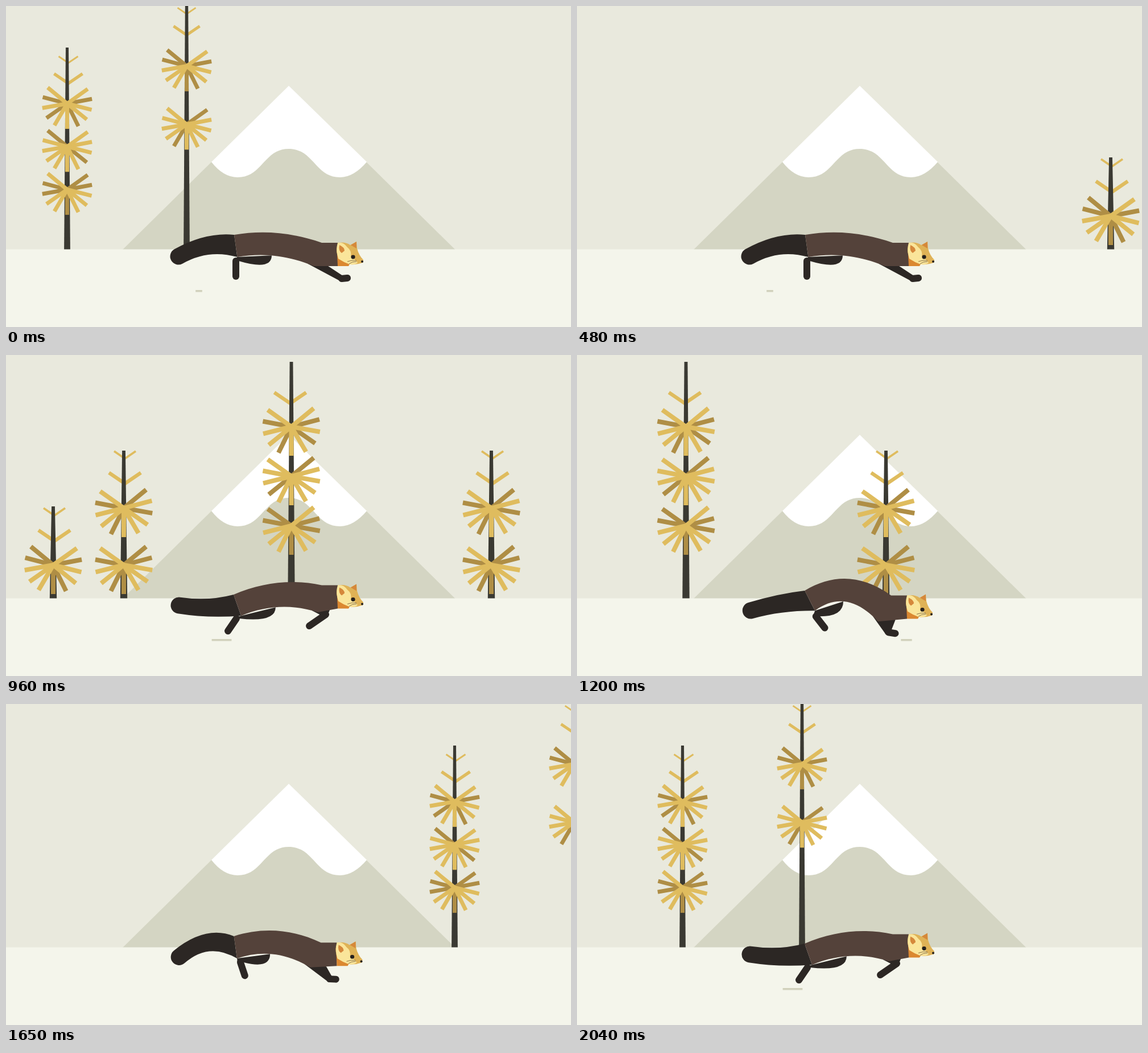
Recreate the animation shown at these times as an HTML page. Size 993x564 px, loop 2070 ms.

```html
<!DOCTYPE html>
<html lang="en">
<head>
<meta charset="utf-8">
<title>Running marten</title>
<style>
html, body { margin: 0; width: 100%; height: 100%; overflow: hidden; background: #e9e9dd; }
svg { display: block; width: 993px; height: 564px; }
</style>
</head>
<body>
<svg viewBox="0 0 993 564">
  <rect width="993" height="564" fill="#e9e9dd"/>
  <path d="M497 140L789.500 428H205Z" fill="#d4d5c3"/>
  <path d="M497 140L634 274Q611 301 587 301C543 301 541 251 497 251C453 251 451 301 407 301Q382 301 361 274Z" fill="#fff"/>
  <g id="trees"></g>
  <rect y="427.5" width="993" height="137" fill="#f4f5eb"/>
  <rect id="shadow" y="499" height="3.500" fill="#d1d1bc"/>
  <g fill="#2c2724" stroke="#2c2724" stroke-width="0">
    <path id="tail"/>
    <path id="hindLeg"/>
    <path id="frontLeg"/>
    <g stroke-width="12" stroke-linecap="round">
      <path id="hindPaw"/>
      <path id="frontPaw"/>
    </g>
  </g>
  <path id="torso" fill="#54423a"/>
  <g id="head">
    <path d="M582 436L583 457L602 457L606 450Z" fill="#db8831"/>
    <path d="M584 416Q597 414 605 420L616 414L617 426Q620 438 628 446L627 451Q616 455 606 454L588 446Q580 438 581 426Z" fill="#dfb256"/>
    <path d="M583 416Q593 414 600 424Q608 430 606 440Q613 444 618 451Q612 455 604 454Q593 450 584 444Q579 428 583 416Z" fill="#fae59a"/>
    <path d="M586 420Q595 424 595 430L590 434Q584 430 586 420ZM606 420L616 414L616 426Z" fill="#d5883b"/>
    <ellipse cx="610" cy="441" rx="3.6" ry="3.4" fill="#25201d"/>
    <circle cx="626" cy="449" r="2" fill="#25201d"/>
    <path d="M616 447Q608 446 600 449M616 449Q608 449 603 453" fill="none" stroke="#6b5435" stroke-width=".8"/>
  </g>
</svg>
<script>
const LOOP = 2070, STEP = 30, STRIDE = 18, WORLD = 3212, MARGIN = 300;
const LIGHT = '#dfbc5e', DARK = '#af8e45', BARK = '#3a3932';
const $ = id => document.getElementById(id);
const rad = degrees => degrees * Math.PI / 180;
const clamp01 = v => Math.max(0, Math.min(1, v));
const add = ([x, y], dx, dy) => [x + dx, y + dy];
const mix = (a, b, k) => a.map((v, i) => v + (b[i] - v) * k);

// Needles a-e fan down the left side, f-j down the right, k hangs; letters in `dark` are shaded.
function cluster(y, dark, scale, flip) {
  const isDark = c => dark.includes(c);
  const needle = c => {
    const i = 'abcdefghijk'.indexOf(c), left = i < 5;
    const tilt = rad((left === flip ? 39.5 : 35.5) - 24.8 * (i % 5));
    const side = left ? -1 : 1, reach = 51 * scale;
    const dx = c === 'k' ? 0 : side * reach * Math.cos(tilt);
    const dy = c === 'k' ? reach : -reach * Math.sin(tilt);
    return `<path d="M0 ${y}l${dx} ${dy}" stroke="${isDark(c) ? DARK : LIGHT}" stroke-width="${8 * scale}"/>`;
  };
  return [...'abcdefghijk'].sort((a, b) => isDark(b) - isDark(a)).map(needle).join('');
}

const fork = (y, span, lean) =>
  `<path d="M${lean - span} ${y - span * .68}L${lean} ${y}L${lean + span} ${y - span * .68}"
    fill="none" stroke="${LIGHT}" stroke-width="${span * .3 - 2}"/>`;

function tree({ top, scale = 1, lean = 0, flip = false, forks, clusters }) {
  const tip = 2.9 * scale, foot = 6.2 * scale;
  return forks.map(([y, span]) => fork(y, span, lean)).join('') +
    `<path d="M${-tip} ${top}H${tip}L${foot} 428H${-foot}Z" fill="${BARK}"/>` +
    clusters.map(([y, dark]) => cluster(y, dark, scale, flip)).join('');
}

const small = tree({ top: 266, lean: 2, flip: true, forks: [[282, 19], [327, 28]], clusters: [[369, 'abgjk']] });
const medium = tree({ top: 168, lean: 2, forks: [[182, 19], [226, 28]], clusters: [[269, 'befh'], [369, 'befgk']] });
const tall = tree({ top: 12, lean: -2, forks: [[85, 28]], clusters: [[126, 'begi'], [213, 'df'], [300, 'abghk']] });
const slim = tree({ top: 73, scale: .87, lean: 2, flip: true, forks: [[100, 17], [136, 25]],
  clusters: [[171.5, 'bdgj'], [247, 'ai'], [322.5, 'bcfgk']] });
const lofty = tree({ top: -25, scale: .87, flip: true, forks: [[14, 16], [51, 23]],
  clusters: [[105.5, 'abgjk'], [208, 'ef']] });

const forest = [[1664, small], [1788, medium], [2082.5, tall], [2434, medium], [3319.5, slim], [3529.5, lofty]];
$('trees').innerHTML = forest.map(([, art]) => `<g>${art}</g>`).join('');
const treeNodes = [...$('trees').children];

// Distance run, as [time, pixels].
const run = [[0, 0], [480, 726], [720, 1218], [960, 1581], [1440, 2201], [1860, 2861], [2040, 3134], [LOOP, WORLD]];

// Joints of the stride: push off, stretch, front landing, hind landing, gather.
const poses = [
  { at: 0, rump: [400, 421], tail: [304, 440], head: [0, -11.5], chest: [548, 452],
    hind: [[405, 463], [390, 485]], front: [[562, 456], [533, 476]] },
  { at: 2, rump: [401, 402], tail: [303, 440], head: [0, 0], chest: [541, 457],
    hind: [[404, 448], [404, 475]], front: [[590, 479], [600, 478]] },
  { at: 10, rump: [400, 418], tail: [306, 452], head: [-4, 8.5], chest: [525, 472],
    hind: [[425, 463], [446, 481]], front: [[533, 490], [546, 493]] },
  { at: 12, rump: [410, 438], tail: [306, 447], head: [-4, 8.5], chest: [547, 466],
    hind: [[479, 493], [497, 494]], front: [[534, 471], [508, 487]] },
  { at: 16, rump: [402, 444], tail: [313, 428], head: [-1, -6.5], chest: [540, 466],
    hind: [[418, 493], [441, 493]], front: [[558, 471], [520, 475]] }
];
poses.push({ ...poses[0], at: STRIDE });

const between = (keys, t, time) => {
  const i = Math.max(1, keys.findIndex(key => time(key) >= t));
  const a = keys[i - 1], b = keys[i];
  return [a, b, (t - time(a)) / (time(b) - time(a))];
};

function drawMarten(phase) {
  const [from, to, k] = between(poses, phase, pose => pose.at);
  const joint = name => mix(from[name], to[name], k);
  const limb = name => from[name].map((point, i) => mix(point, to[name][i], k));
  const wave = (mean, swing, peak) => mean + swing * Math.cos((phase - peak) * 2 * Math.PI / STRIDE);
  const set = (id, d) => $(id).setAttribute('d', d);

  const rump = joint('rump'), chest = joint('chest'), tip = joint('tail'), head = joint('head');
  const seam = rad(wave(27, 22, 12.5)), arch = wave(20, 10, 11);
  const loin = add(rump, 39.5 * Math.sin(seam), 39.5 * Math.cos(seam));
  const neck = add(head, 583, 416), throat = add(neck, 0, 41), shoulder = add(neck, -28, 0);
  const lift = (a, b, t) => add(mix(a, b, t), 0, -arch * 4 / 3);
  const belly = t => add(mix(loin, chest, t), 0, -arch * 4 * t * (1 - t));

  set('torso', `M${rump}C${lift(rump, shoulder, 1 / 3)} ${lift(rump, shoulder, 2 / 3)} ${shoulder}
    L${neck}L${throat}L${chest}C${lift(chest, loin, 1 / 3)} ${lift(chest, loin, 2 / 3)} ${loin}Z`);

  const root = mix(rump, loin, .5);
  const bend = add(mix(root, tip, .5), 0, 2 * wave(4, 21, 13.5));
  const offset = (p, angle, r) => add(p, r * Math.sin(angle), -r * Math.cos(angle));
  const axis = Math.atan2(root[1] - tip[1], root[0] - tip[0]);
  const tipAxis = Math.atan2(bend[1] - tip[1], bend[0] - tip[0]);
  set('tail', `M${rump}Q${offset(bend, axis, 15)} ${offset(tip, tipAxis, 14.5)}
    A14.5 14.5 0 0 0 ${offset(tip, tipAxis, -14.5)}Q${offset(bend, axis, -15)} ${loin}Z`);

  const [ankle, hindToe] = limb('hind'), thigh = belly(.45);
  set('hindLeg', `M${loin}L${add(ankle, -5, 0)}L${add(ankle, 5, 0)}Q${add(thigh, 0, 27)} ${thigh}Z`);
  set('hindPaw', `M${ankle}L${hindToe}`);

  const [elbow, frontToe] = limb('front');
  set('frontLeg', `M${belly(.92)}L${add(elbow, -5, 3)}L${add(elbow, 5, -3)}L${mix(chest, throat, .6)}Z`);
  set('frontPaw', `M${elbow}L${frontToe}`);

  $('head').setAttribute('transform', `translate(${head})`);
}

// The ground contact drifts back under the body, growing on landing and shrinking after push off.
function drawShadow(phase) {
  const p = phase < 3 ? phase + STRIDE : phase;
  const half = 29 * clamp01(Math.min((p - 7) / 3, (21 - p) / 5));
  $('shadow').setAttribute('x', 539 - 20 * (p - 10) - half);
  $('shadow').setAttribute('width', 2 * half);
}

function draw(time) {
  const t = Math.floor(time % LOOP / STEP) * STEP;
  const [from, to, k] = between(run, t, key => key[0]);
  const distance = mix(from, to, k)[1];
  treeNodes.forEach((node, i) => {
    const x = (forest[i][0] - distance + MARGIN + WORLD) % WORLD - MARGIN;
    node.setAttribute('transform', `translate(${x})`);
  });

  const phase = (t < 480 ? 2 + t / 480 * STRIDE : (t - 420) / STEP) % STRIDE;
  drawMarten(phase);
  drawShadow(phase);
}

const start = performance.now();
function tick() {
  draw(performance.now() - start);
  requestAnimationFrame(tick);
}
tick();
</script>
</body>
</html>
```
